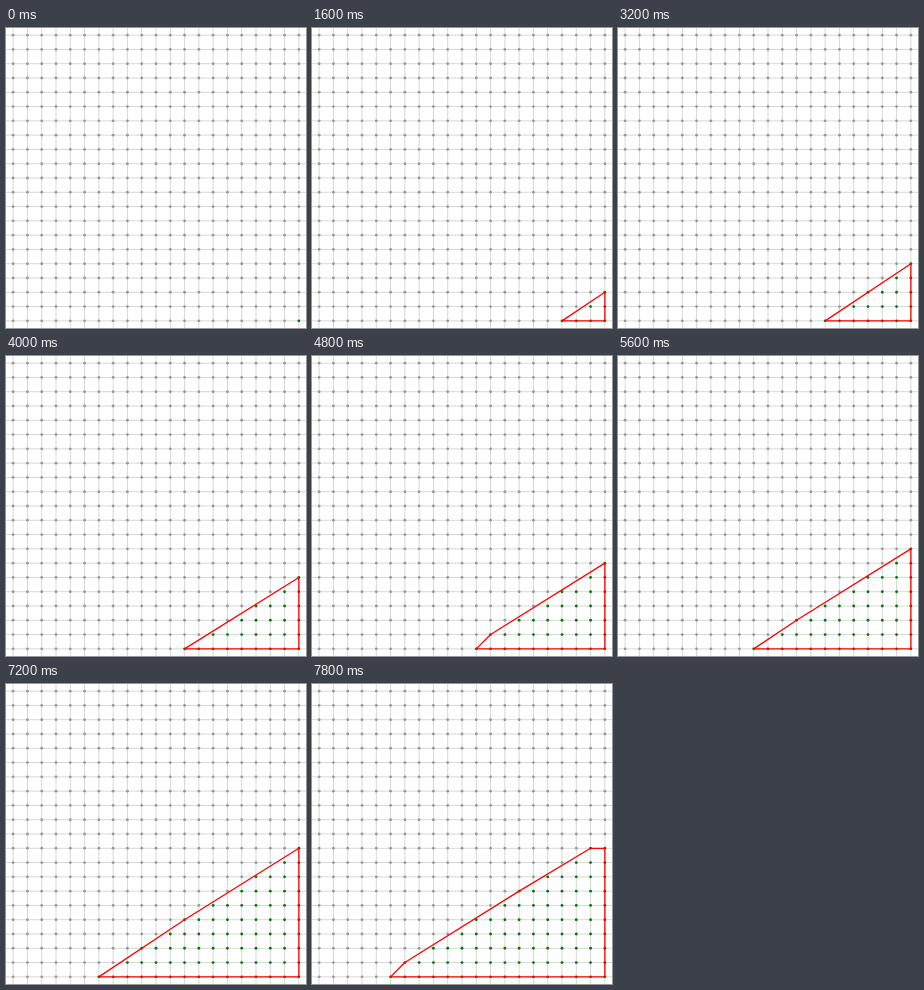
Animation of 300x300 px, one loop 8000 ms. Source, as an HTML page:

```html
<!DOCTYPE html>
<html lang="en">
<head>
<meta charset="utf-8">
<title>Lattice points in a growing triangle</title>
<style>
  html, body { margin: 0; width: 100%; height: 100%; overflow: hidden; background: #fff; }
  svg { display: block; width: 100%; height: 100%; }
  .grid { stroke: #ccc; stroke-width: .055; }
  .dot { fill: #999; }
  .dot.inside { fill: #007a00; }
  .hull { fill: none; stroke: #f00; stroke-width: .09; stroke-linejoin: round; }
</style>
</head>
<body>
<svg viewBox="0 0 21 21"></svg>
<script>
  const SIZE = 21, STEP = 200, STEPS = 40;
  const svg = document.querySelector('svg');

  function add(tag, attrs) {
    const node = document.createElementNS('http://www.w3.org/2000/svg', tag);
    for (const key in attrs) node.setAttribute(key, attrs[key]);
    return svg.appendChild(node);
  }

  // Lattice coordinates count left and up from the bottom right dot.
  const place = n => SIZE - n - .5;

  for (let i = 0; i < SIZE; i++) {
    const c = place(i);
    add('line', { class: 'grid', x1: 0, x2: SIZE, y1: c, y2: c });
    add('line', { class: 'grid', x1: c, x2: c, y1: 0, y2: SIZE });
  }

  const dots = [];
  for (let x = 0; x < SIZE; x++)
    for (let y = 0; y < SIZE; y++)
      dots.push({ x, y, node: add('circle', { class: 'dot', cx: place(x), cy: place(y), r: .1 }) });

  const hull = add('polygon', { class: 'hull' });

  const cross = (o, a, b) => (a.x - o.x) * (b.y - o.y) - (a.y - o.y) * (b.x - o.x);

  function halfHull(points) {
    const chain = [];
    for (const p of points) {
      while (chain.length > 1 && cross(chain.at(-2), chain.at(-1), p) <= 0) chain.pop();
      chain.push(p);
    }
    return chain.slice(0, -1);
  }

  // The k-th dilate of the triangle with legs 2/5 and 1/4.
  function draw(k) {
    const inside = dots.filter(d => {
      const hit = 5 * d.x + 8 * d.y <= 2 * k;
      d.node.classList.toggle('inside', hit);
      return hit;
    });
    const outline = [...halfHull(inside), ...halfHull([...inside].reverse())];
    hull.setAttribute('points', outline.map(p => `${place(p.x)},${place(p.y)}`).join(' '));
  }

  let shown = -1;
  function tick() {
    const k = Math.floor(performance.now() / STEP) % STEPS;
    if (k !== shown) draw(shown = k);
    requestAnimationFrame(tick);
  }
  tick();
</script>
</body>
</html>
```
